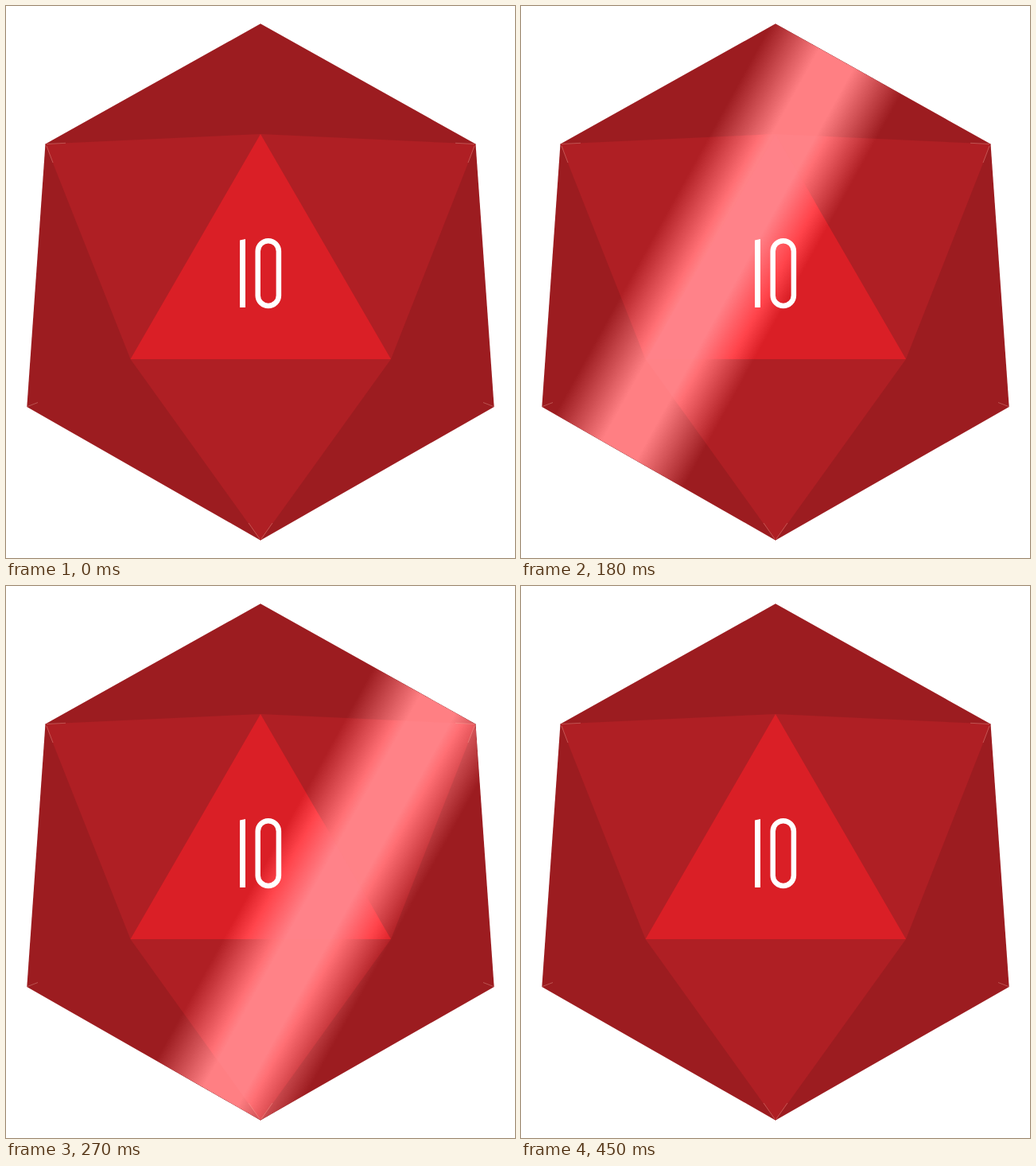
Write an HTML page that moves like this. It is 640 px wide and 694 px high and loops after 4.5 s.

```html
<!DOCTYPE html>
<html lang="en">
<head>
<meta charset="utf-8">
<title>Die with a passing gleam</title>
<style>
  html, body { margin: 0; width: 100%; height: 100%; overflow: hidden; background: #fff; }
  svg { display: block; width: 640px; height: 694px; }
  .die { isolation: isolate; }
  .gleam { mix-blend-mode: plus-lighter; }
  .band { animation: sweep 4500ms infinite; }

  /* 56px every 30ms, then a long rest off the die */
  @keyframes sweep {
    0% { transform: translateX(-100px); animation-timing-function: step-end; }
    0.66% { transform: translateX(56px); animation-timing-function: steps(14, end); }
    9.99%, 100% { transform: translateX(840px); }
  }
</style>
</head>
<body>
<svg viewBox="0 0 640 694" role="img" aria-label="10">
  <defs>
    <path id="outline" d="M320 22.3L590.5 173.5L613.7 504L320 671.7L26.3 504L49.5 173.5Z"/>
    <clipPath id="inside"><use href="#outline"/></clipPath>
    <linearGradient id="shine">
      <stop offset="0" stop-color="#fff" stop-opacity="0"/>
      <stop offset=".37" stop-color="#fff" stop-opacity=".39"/>
      <stop offset=".63" stop-color="#fff" stop-opacity=".39"/>
      <stop offset="1" stop-color="#fff" stop-opacity="0"/>
    </linearGradient>
  </defs>

  <g class="die">
    <use href="#outline" fill="#9c1c20"/>
    <path fill="#af1f24" d="M49.5 173.5L320 161L590.5 173.5L484 444L320 671.7L156.500 444Z"/>
    <path fill="#da1f26" d="M320 161L484 444H156.500Z"/>
    <g class="gleam" clip-path="url(#inside)">
      <g transform="rotate(29)">
        <rect class="band" x="-50" y="-220" width="186" height="740" fill="url(#shine)"/>
      </g>
    </g>
  </g>

  <!-- fine seams at the corners -->
  <path fill="none" stroke="#f0b8a8" stroke-opacity=".5" stroke-width=".7"
    d="M51 173.500L75 172.300M51 176L59 197M589 173.500L565 172.300M589 176L581 197
       M27 503.500L40 498.500M613 503.500L600 498.500M319 670L305 650M321 670L335 650"/>

  <path fill="#fff" d="M294 294.500L301 293V379H294Z"/>
  <rect x="316.700" y="295.200" width="26.200" height="81.800" rx="13.100" fill="none" stroke="#fff" stroke-width="6.500"/>
</svg>
</body>
</html>
```
